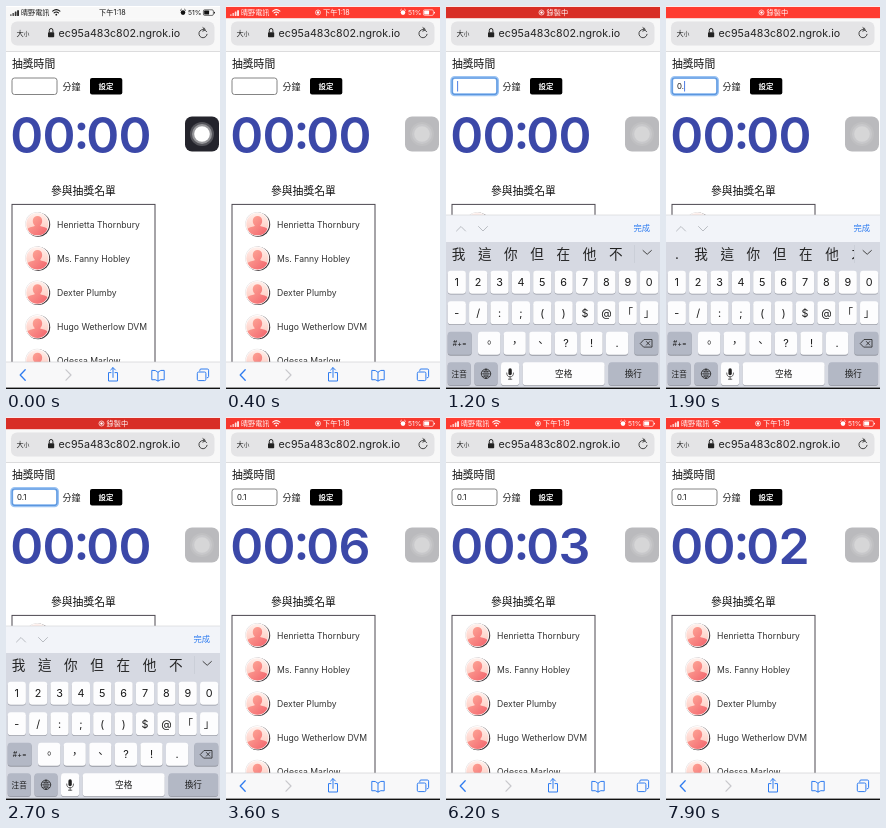
Write an HTML page that moves like this. It is 214 px wide and 383 px high and loops after 8 s.

```html
<!DOCTYPE html>
<html lang="zh-Hant">
<head>
<meta charset="utf-8">
<style>
  html, body { margin: 0; width: 100%; height: 100%; overflow: hidden; background: #fff; }
  svg { display: block; width: 100vw; height: 100vh; }
  text { font-family: Inter, "Noto Sans CJK TC", "Noto Sans CJK", "Noto Sans CJK JP", sans-serif; white-space: pre; }
  .line { fill: none; stroke-linecap: round; stroke-linejoin: round; }
</style>
</head>
<body>
<svg id="stage" viewBox="0 0 214 383" xmlns="http://www.w3.org/2000/svg"></svg>
<script>
const LOOP = 8000, BLUE = '#2f7cf0';
const NAMES = ['Henrietta Thornbury', 'Ms. Fanny Hobley', 'Dexter Plumby', 'Hugo Wetherlow DVM', 'Odessa Marlow'];
const START = 3000;                       // countdown begins
const KEYS_IN = 700, KEYS_OUT = 2900;     // keyboard slides
const TYPED = [[1400, '0'], [1800, '0.'], [2250, '0.1']];

const text = (x, y, size, s, fill = '#111', extra = '') =>
  `<text x="${x}" y="${y}" font-size="${size}" fill="${fill}" ${extra}>${s}</text>`;
const mid = (x, y, size, s, fill, extra = '') => text(x, y, size, s, fill, 'text-anchor="middle" ' + extra);
const rect = (x, y, w, h, fill, r = 0, extra = '') =>
  `<rect x="${x}" y="${y}" width="${w}" height="${h}" rx="${r}" fill="${fill}" ${extra}/>`;
const line = (d, color, w = 1, extra = '') => `<path class="line" d="${d}" stroke="${color}" stroke-width="${w}" ${extra}/>`;
const circle = (x, y, r, fill, extra = '') => `<circle cx="${x}" cy="${y}" r="${r}" fill="${fill}" ${extra}/>`;

function avatar(y) {
  return `<g transform="translate(31.5 ${y})">
    ${circle(0.6, 0.3, 12.1, '#3a3236')}${circle(-0.3, -0.3, 12, '#e6e0e0')}${circle(-0.2, -0.2, 11.6, '#fff')}
    ${circle(-0.2, -0.2, 11, 'url(#skin)')}
    <path d="M-10 4.6C-8 2.4-4.4 2.8-2.6 1.4C-6.4-2.4-4.8-8.4 0-8.4S6.4-2.4 2.6 1.4C4.4 2.8 8 2.4 10 4.6A11 11 0 0 1-10 4.6Z" fill="url(#person)"/>
  </g>`;
}

function page() {
  const rows = NAMES.map((n, i) => {
    const y = 218.3 + 34.2 * i;
    return avatar(y) + text(51, y + 3.3, 8.65, n, '#333');
  }).join('');
  return text(6, 62.3, 10.8, '抽獎時間') +
    rect(6, 72, 45, 16.5, '#fff', 2.5, 'stroke="#777" stroke-width=".9"') +
    `<g id="focus">${rect(5.7, 71.5, 45.8, 17.3, 'none', 3, 'stroke="#9cc4f3" stroke-width="3"')}
      ${rect(6.2, 72, 44.8, 16.3, 'none', 2.5, 'stroke="#5b96df" stroke-width="1.2"')}</g>` +
    text(11, 83.3, 7.8, '', '#111', 'id="field"') + rect(11, 75, 0.9, 10.5, '#3b6fe0', 0, 'id="caret"') +
    text(56.4, 83.9, 9, '分鐘', '#222') +
    rect(84, 72, 32.3, 16.5, '#000', 2) + mid(100, 83.1, 7.4, '設定', '#fff', 'font-weight="600"') +
    `<g font-weight="600" letter-spacing="-.6">` +
    text(4.2, 146.5, 50, '00', '#3b48a8') + mid(75.2, 143, 50, ':', '#3b48a8') +
    text(80.2, 146.5, 50, '00', '#3b48a8', 'id="seconds"') + '</g>' +
    text(45, 189.2, 10.8, '參與抽獎名單', '#111', 'font-weight="500"') +
    rect(6, 198.4, 143, 190, 'none', 0, 'stroke="#4c4850" stroke-width="1"') + rows;
}

function statusBar() {
  const bars = [0, 1, 2, 3].map(i => rect(4 + 2.4 * i, 8.2 - 1.3 * i, 1.7, 1.7 + 1.3 * i, 'currentColor', 0.3, `opacity="${0.55 + 0.15 * i}"`)).join('');
  const rec = x => circle(x, 6.5, 2.5, 'none', 'stroke="currentColor" stroke-width=".7"') + circle(x, 6.5, 1.2, 'currentColor');
  return rect(0, 0, 214, 1, '#fff') + rect(0, 0.9, 214, 11.3, '#f8f8f8', 0, 'id="barBg"') + `<g id="bar">
    <g id="sides">${bars}${text(15, 9.2, 7.1, '晴野電訊', 'currentColor')}
      ${line('M46.7 5.2Q50.3 2 53.9 5.2M48.1 6.9Q50.3 5 52.5 6.9', 'currentColor', 1.1)}${circle(50.3, 8.7, 0.9, 'currentColor')}
      ${circle(177, 6.6, 2.3, 'currentColor')}${line('M174.4 4.3l1-1M179.6 4.3l-1-1', 'currentColor', 0.8)}
      ${text(182, 9.2, 6.8, '51%', 'currentColor')}
      ${rect(197.4, 3.8, 10, 5.6, 'none', 1.3, 'stroke="currentColor" stroke-width=".6"')}${rect(198.2, 4.6, 4.9, 4, 'currentColor', 0.6)}
      ${rect(208, 5.7, 0.9, 1.9, 'currentColor', 0.4)}</g>
    <g id="rec">${rec(92)}</g>${text(97, 9.2, 7.2, '', 'currentColor', 'id="clock"')}</g>`;
}

function addressBar() {
  return rect(0, 12, 214, 33.5, '#f8f8f8') + rect(0, 45, 214, 0.6, '#c8c8ca') + rect(5, 15.5, 203.5, 24, '#e4e4e6', 6) +
    text(10.5, 30.3, 7.2, '大', '#222') + text(17.7, 30.3, 5.6, '小', '#222') +
    rect(42, 26.2, 6.2, 5, '#222', 0.8) + line('M43.3 26V24.3a1.8 1.8 0 0 1 3.6 0V26', '#222', 1) +
    text(52.6, 31, 10.7, 'ec95a483c802.ngrok.io', '#222') +
    line('M200.6 25.6A4.1 4.1 0 1 0 201.1 28.3M198.2 22.2L197.3 23.4M196.9 21.6L199.3 23.5L196.9 25.2', '#333', 0.9);
}

function toolbar() {
  return rect(0, 356, 214, 27, '#f8f8f9') + rect(0, 355.7, 214, 0.6, '#c9c9cc') +
    line('M19.2 363.8L14.2 369L19.2 374.2', BLUE, 1.3) + line('M60 363.8L65 369L60 374.2', '#c8c8cc', 1.2) +
    line('M105 366.6H102.5V375H111.5V366.6H109M107 371.4V361.8M104.6 364L107 361.6L109.4 364', BLUE, 1) +
    line('M152 366.2Q149.5 363.6 145.8 364.4V373.8Q149.5 373 152 375Q154.5 373 158.2 373.8V364.4Q154.5 363.6 152 366.2V375', BLUE, 1) +
    rect(191.3, 366, 8.6, 8.6, 'none', 1.3, `stroke="${BLUE}"`) +
    line('M193.8 364.8V364.2Q193.8 363 195 363H201.4Q202.6 363 202.6 364.2V370.6Q202.6 371.8 201.2 371.8', BLUE, 1);
}

function floatButton() {
  return `<g id="float">${rect(179, 110.5, 34, 35, '#24242c', 7)}<g id="rings">
    ${circle(196, 128, 12, '#fff', 'opacity=".22"')}${circle(196, 128, 10, '#fff', 'opacity=".4"')}${circle(196, 128, 7.8, '#fff')}</g></g>`;
}

function key(x, y, w, label = '', size = 10.8, fill = '#fdfdfe') {
  return rect(x, y + 0.9, w, 23, '#9699a3', 3) + rect(x, y, w, 23, fill, 3) +
    mid(x + w / 2, y + 11.7 + size * 0.36, size, label, '#1a1a1a');
}

function keyboard() {
  const GREY = '#b3b8c5';
  const row = (chars, x, y, w, step) => [...chars].map((c, i) => key(x + step * i, y, w, c)).join('');
  return rect(0, 209, 214, 27.5, '#f2f4f9') + rect(0, 208.7, 214, 0.6, '#cfd1d5') + rect(0, 236, 214, 150, '#d6d9e2') +
    line('M10.5 225L15 220.5L19.5 225M32.5 220.5L37 225L41.5 220.5', '#b9bcc2', 1) +
    text(187.5, 225.3, 8.3, '完成', BLUE, 'font-weight="500"') +
    '<g id="candidates" clip-path="url(#strip)"></g>' +
    rect(188.5, 239, 0.5, 18, '#c0c4ce') + line('M197 244.5L201.2 248.3L205.4 244.5', '#444', 1) +
    row('1234567890', 1.7, 264.7, 18.2, 21.37) + row('-/:;()$@「」', 1.7, 295.2, 18.2, 21.37) +
    row('。，、?!.', 32, 325.8, 22.2, 25.6) +
    key(1.7, 325.8, 24, '#+=', 7, GREY) + key(188.3, 325.8, 24, '', 8, GREY) +
    line('M194.5 337.3L198 333.5H206V341.1H198ZM200.4 335.5L203.8 339.1M203.8 335.5L200.4 339.1', '#222', 0.8) +
    key(1.7, 356.2, 23, '注音', 7.6, GREY) + key(28.5, 356.2, 23, '', 8, GREY) +
    circle(40, 367.8, 4.7, 'none', 'stroke="#222" stroke-width=".8"') +
    line('M35.3 367.8H44.7M40 363.1V372.5M36.4 365.2Q40 366.4 43.6 365.2M36.4 370.4Q40 369.2 43.6 370.4M40 363.1Q35.6 367.8 40 372.5Q44.4 367.8 40 363.1', '#222', 0.6) +
    key(55, 356.2, 18.2) + rect(62.4, 362.2, 3.4, 7, '#222', 1.7) +
    line('M60.7 367Q60.7 370.8 64.1 370.8T67.5 367M64.1 370.8V373.2M62.4 373.2H65.8', '#222', 0.7) +
    key(76.7, 356.2, 82, '空格', 8.6) + key(162.6, 356.2, 49.5, '換行', 8.6, GREY);
}

const stage = document.getElementById('stage');
stage.innerHTML = `<defs>
    <linearGradient id="skin" x1="0" y1="0" x2="0" y2="1"><stop stop-color="#fff0ec"/><stop offset="1" stop-color="#ffc2b6"/></linearGradient>
    <linearGradient id="person" x1="0" y1="0" x2="1" y2="1"><stop stop-color="#ffad9b"/><stop offset="1" stop-color="#f2626c"/></linearGradient>
    <clipPath id="strip"><rect x="0" y="236" width="188" height="25"/></clipPath>
  </defs>` + rect(0, 0, 214, 383, '#fff') + page() + floatButton() + addressBar() + statusBar() + toolbar() +
  `<g id="keyboard">${keyboard()}</g>` + rect(0, 381.6, 214, 1.4, '#111');

const el = id => document.getElementById(id);
const show = (id, on) => el(id).setAttribute('visibility', on ? 'visible' : 'hidden');
const set = (id, s) => { if (el(id).textContent !== s) el(id).textContent = s; };
const ramp = (t, from, length) => Math.min(1, Math.max(0, (t - from) / length));
const ease = p => 1 - (1 - p) ** 3;

let lastStrip = null;
function drawCandidates(first) {
  if (first === lastStrip) return;
  lastStrip = first;
  const shift = first ? 35 : 12.5;
  el('candidates').innerHTML = (first ? mid(11, 253.3, 13.6, first, '#222') : '') +
    [...(first ? '我這你但在他才' : '我這你但在他不')].map((c, i) => mid(shift + 26.2 * i, 253.3, 13.6, c, '#222')).join('');
}

function draw(t) {
  const red = t >= 200, recording = t >= 900 && t < 2850, focused = t >= 650 && t < KEYS_OUT;
  const pulse = 0.5 + 0.5 * Math.cos((t - 475) / 1450 * 2 * Math.PI);
  const mix = (a, b) => Math.round(a + (b - a) * pulse);
  el('barBg').setAttribute('fill', red ? `rgb(${mix(216, 255)},${mix(46, 59)},${mix(38, 48)})` : '#f8f8f8');
  el('bar').style.color = red ? '#fff' : '#111';
  show('sides', !recording);
  show('rec', red);
  el('rec').setAttribute('transform', recording ? 'translate(3.5 0)' : '');
  set('clock', recording ? '錄製中' : t < 4800 ? '下午1:18' : '下午1:19');
  el('clock').setAttribute('x', recording ? 100.5 : red ? 97 : 93);

  const fade = ramp(t, 100, 250);
  el('float').setAttribute('opacity', 1 - 0.69 * fade);
  el('rings').setAttribute('opacity', 1 - 0.6 * fade);

  const typed = TYPED.filter(([at]) => t >= at).map(([, s]) => s).pop() || '';
  set('field', typed);
  show('focus', focused);
  show('caret', focused && (t - 1100 + 2000) % 1000 < 600 || focused && t >= 1400 && t < 2500);
  el('caret').setAttribute('x', 11.2 + (typed ? el('field').getComputedTextLength() : 0));
  drawCandidates(typed === '0.' ? '.' : '');

  const up = ease(ramp(t, KEYS_IN, 300)) - ease(ramp(t, KEYS_OUT, 300));
  el('keyboard').setAttribute('transform', `translate(0 ${176 * (1 - up)})`);
  show('keyboard', up > 0);

  const left = t < START ? 0 : 6 - Math.floor((t - START) / 1000);
  set('seconds', String(left).padStart(2, '0'));
}

function frame() {
  draw(performance.now() % LOOP);
  requestAnimationFrame(frame);
}
frame();
</script>
</body>
</html>
```
